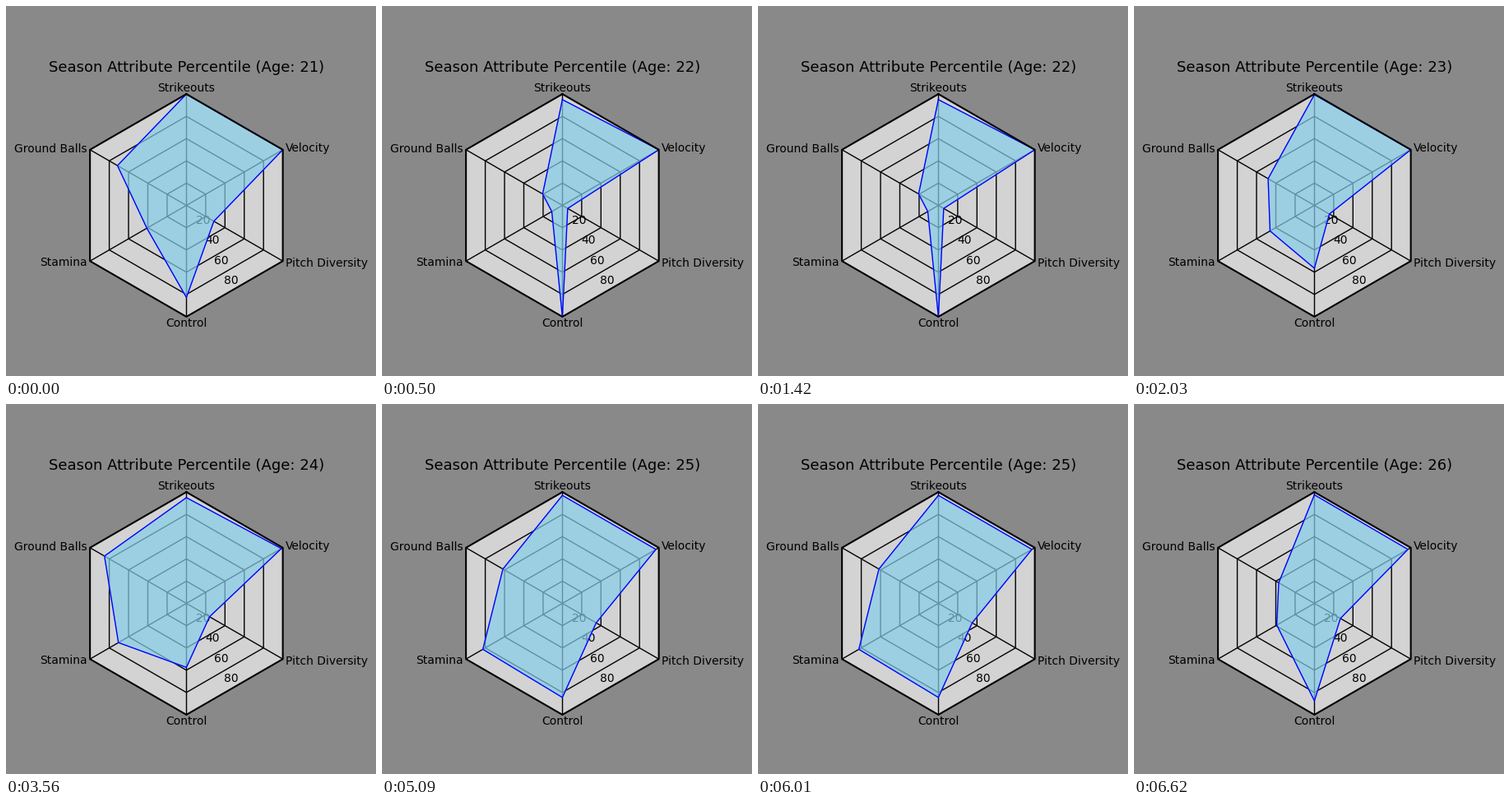
Animation of 450 by 450 pixels, one loop 8000 ms. Source, as a matplotlib script:

```python
import numpy as np
import matplotlib.pyplot as plt
from matplotlib.animation import FuncAnimation
from matplotlib.collections import LineCollection

SIZE, DPI = 450, 100
CX, CY, R = 219.4, 242.5, 135.4
STEP, LOOP = 20, 8000        # ms
FIRST, HOLD = 500, 1530      # ms: first season, then each later one
FIRST_AGE = 21

# Percentiles, counter-clockwise from the top:
# strikeouts, ground balls, stamina, control, pitch diversity, velocity
SEASONS = np.array([
    [100, 71.5, 41, 82.7, 28.5, 100],
    [95, 20.5, 11, 100, 5.5, 100],
    [99.5, 48, 46, 56.5, 15.5, 100],
    [95, 85, 70.5, 57.5, 24, 98.5],
    [97, 61.7, 82.5, 84.5, 35, 97],
    [97.5, 37, 39, 87.5, 27, 97],
])
ANGLES = np.arange(6) * np.pi / 3


def spokes(values):
    """Pixel positions of percentiles on the six axes."""
    r = np.asarray(values) * R / 100
    return np.column_stack([CX - r * np.sin(ANGLES), CY - r * np.cos(ANGLES)])


def closed(points):
    return np.vstack([points, points[:1]])


def ring(value):
    return closed(spokes(np.full(6, value)))


fig = plt.figure(figsize=(SIZE / DPI, SIZE / DPI), dpi=DPI, facecolor="#898989")
ax = fig.add_axes([0, 0, 1, 1])
ax.set(xlim=(0, SIZE), ylim=(SIZE, 0))
ax.axis("off")
plt.rcParams["font.family"] = "DejaVu Sans"

rim = ring(100)
ax.fill(*rim.T, color="lightgray", lw=0, zorder=0)
axes_lines = [[(CX, CY), p] for p in rim[:6]]
rings = [ring(v) for v in (20, 40, 60, 80)]
ax.add_collection(LineCollection(axes_lines + rings, colors="black",
                                 linewidths=1, zorder=0.5))
ax.plot(*rim.T, color="black", lw=1.5, zorder=2.5)

tilt = np.radians(24.7)
for v in (20, 40, 60, 80):
    r = v * R / 100
    ax.text(CX + r * np.sin(tilt), CY + r * np.cos(tilt) - 2.5, str(v),
            size=10, zorder=0.6)

for label, x, y, ha in [
    ("Strikeouts", CX, 104.5, "center"),
    ("Ground Balls", 99, 177.5, "right"),
    ("Stamina", 99, 316.5, "right"),
    ("Control", CX, 389.5, "center"),
    ("Pitch Diversity", 339.5, 316.5, "left"),
    ("Velocity", 339.5, 177.5, "left"),
]:
    ax.text(x, y, label, ha=ha, size=10, zorder=3)

title = ax.text(CX, 80, "", ha="center", size=13, zorder=3)
area, = ax.fill(*rim.T, color="skyblue", alpha=0.7, lw=1, zorder=1)
edge, = ax.plot([], [], color="blue", lw=1, zorder=2)


def draw(i):
    season = (i * STEP - FIRST + STEP // 2) // HOLD + 1
    points = closed(spokes(SEASONS[season]))
    area.set_xy(points)
    edge.set_data(*points.T)
    title.set_text(f"Season Attribute Percentile (Age: {FIRST_AGE + season})")
    return area, edge, title


anim = FuncAnimation(fig, draw, frames=LOOP // STEP, interval=STEP,
                     repeat=True, repeat_delay=0)
plt.show()
```
